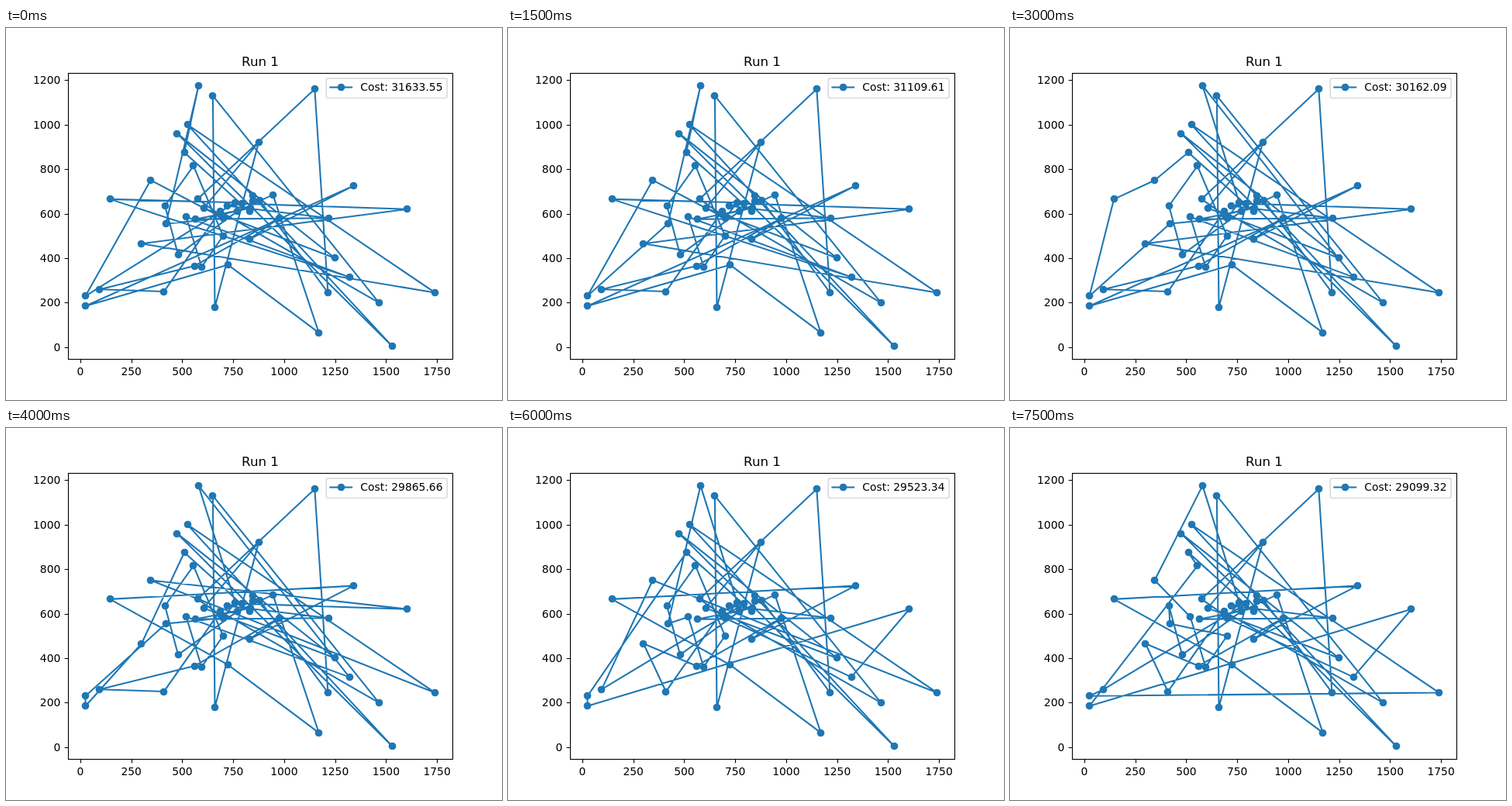
Recreate the animation shown at these times as an HTML page. Size 640 px wide and 480 px high, loop 8 s.

```html
<!DOCTYPE html>
<html lang="en">
<head>
<meta charset="utf-8">
<title>Run 1</title>
<style>
  html, body { margin: 0; width: 100%; height: 100%; overflow: hidden; background: #fff; }
  svg { display: block; width: 640px; height: 480px; }
  text { font: 13.889px "DejaVu Sans", sans-serif; fill: #000; }
  .title { font-size: 16.667px; text-anchor: middle; }
  .mid { text-anchor: middle; }
  .end { text-anchor: end; }
  .axis { fill: none; stroke: #000; stroke-width: 1.11; }
  .tour { fill: none; stroke: #1f77b4; stroke-width: 2.083; stroke-linejoin: round; }
  .dot { fill: #1f77b4; }
  .box { fill: #fff; fill-opacity: .8; stroke: #ccc; stroke-opacity: .8; stroke-width: 1.389; }
</style>
</head>
<body>
<svg id="plot" viewBox="0 0 640 480"></svg>
<script>
const svg = document.getElementById('plot');

// Stops in visiting order; the route closes on itself.
const stops = [
  [510, 875], [580, 1175], [420, 555], [700, 580], [345, 750], [25, 230], [760, 650],
  [145, 665], [1320, 315], [520, 585], [595, 360], [700, 500], [555, 815], [415, 635],
  [480, 415], [770, 610], [945, 685], [1170, 65], [725, 370], [25, 185], [1340, 725],
  [830, 485], [975, 580], [560, 365], [95, 260], [410, 250], [685, 610], [1465, 200],
  [650, 1130], [660, 180], [875, 920], [605, 625], [1250, 400], [475, 960], [1530, 5],
  [845, 680], [525, 1000], [1740, 245], [300, 465], [1605, 620], [795, 645], [720, 635],
  [1220, 580], [565, 575], [835, 625], [685, 595], [575, 665], [1150, 1160], [1215, 245],
  [880, 660], [845, 655], [830, 610]
];

// Each step exchanges the stops at two positions of the route.
const swaps = [
  [1, 5], [1, 3], [1, 5], [1, 7], [1, 2], [1, 4], [2, 19], [1, 38],
  [1, 3], [3, 24], [4, 8], [3, 39], [1, 38], [1, 8], [1, 12]
];
const STEP = 500;
const START_COST = 31633.55;

const px = x => 95.97 + x * 0.26292;
const py = y => 411.84 - y * 0.28718;
const snap = v => Math.floor(v) + 0.5;

function add(tag, attrs, text) {
  const el = document.createElementNS('http://www.w3.org/2000/svg', tag);
  for (const key in attrs) el.setAttribute(key, attrs[key]);
  if (text) el.textContent = text;
  svg.appendChild(el);
  return el;
}

function dot(x, y) {
  add('circle', { class: 'dot', cx: x, cy: y, r: 4.86 });
}

function routeLength(route) {
  return route.reduce((sum, [x, y], i) => {
    const [nx, ny] = route[(i + 1) % route.length];
    return sum + Math.hypot(nx - x, ny - y);
  }, 0);
}

// Routes and costs for every step
const routes = [stops];
for (const [a, b] of swaps) {
  const next = routes[routes.length - 1].slice();
  [next[a], next[b]] = [next[b], next[a]];
  routes.push(next);
}
const startLength = routeLength(stops);
const states = routes.map(route => ({
  points: route.map(([x, y]) => px(x).toFixed(2) + ',' + py(y).toFixed(2)).join(' '),
  label: 'Cost: ' + (START_COST + routeLength(route) - startLength).toFixed(2)
}));

// Route and stops
const tour = add('polygon', { class: 'tour' });
for (const [x, y] of stops) dot(snap(px(x)), snap(py(y)));

// Axes
add('rect', { class: 'axis', x: 80.5, y: 58.5, width: 496, height: 369 });
for (let v = 0; v <= 1750; v += 250) {
  const x = snap(px(v) + 0.5);
  add('path', { class: 'axis', d: `M${x} 427.5v4.86` });
  add('text', { class: 'mid', x: px(v), y: 448 }, String(v));
}
for (let v = 0; v <= 1200; v += 200) {
  const y = snap(py(v) + 0.5);
  add('path', { class: 'axis', d: `M80.5 ${y}h-4.86` });
  add('text', { class: 'end', x: 70.3, y: Math.round(py(v) + 5) }, String(v));
}
add('text', { class: 'title', x: 328, y: 49 }, 'Run 1');

// Legend
add('rect', { class: 'box', x: 413.2, y: 65, width: 156, height: 25.4, rx: 2.78 });
add('path', { class: 'tour', d: 'M417.4 76.5h29.8' });
dot(432.5, 76.5);
const cost = add('text', { class: 'end', x: 563.5, y: 81 }, states[0].label);

let shown = -1;
function draw(now) {
  const step = Math.floor(now / STEP) % states.length;
  if (step !== shown) {
    shown = step;
    tour.setAttribute('points', states[step].points);
    cost.textContent = states[step].label;
  }
}

const begin = performance.now();
function tick() {
  draw(performance.now() - begin);
  requestAnimationFrame(tick);
}
tick();
</script>
</body>
</html>
```
